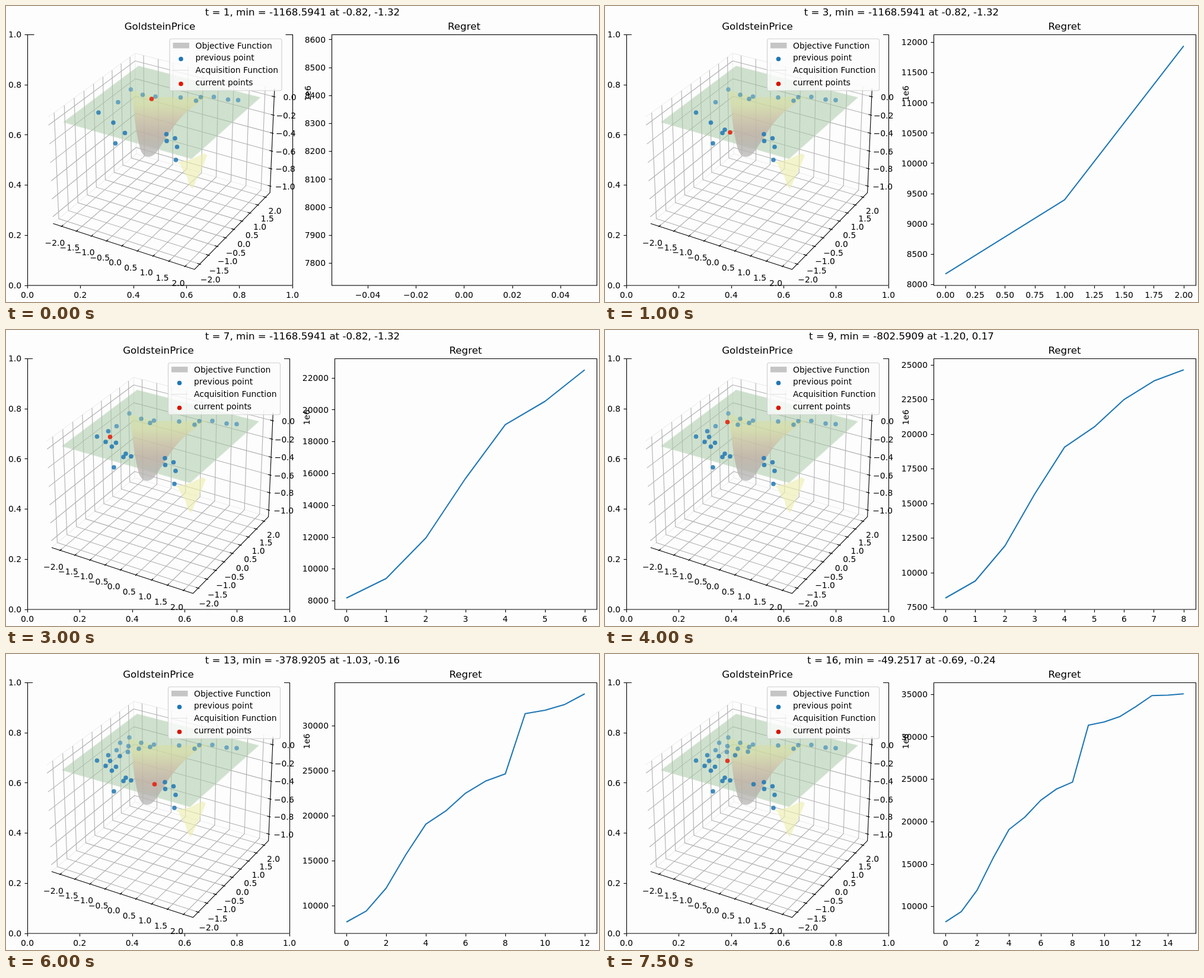
Recreate the animation shown at these times as an HTML page with a canvas. Size 1000x500 px, loop 8 s.

```html
<!DOCTYPE html>
<html lang="en">
<head>
<meta charset="utf-8">
<title>Optimisation progress</title>
<style>
html, body { margin: 0; width: 100%; height: 100%; overflow: hidden; background: #fdfdfd; }
canvas { display: block; width: 1000px; height: 500px; }
</style>
</head>
<body>
<canvas id="stage"></canvas>
<script>
const STEP = 500, LOOP = 8000;
const FONT = '"DejaVu Sans", sans-serif';
const BLUE = '#1f77b4', GRID = '#b0b0b0', PAPER = '#fdfdfd';
const TOP = 48, BOTTOM = 472;

const regret = [8169, 9397, 11942, 15690, 19062, 20525, 22505, 23843,
  24646, 31352, 31731, 32380, 33560, 34838, 34887, 35045];
const minima = [[1, '-1168.5941 at -0.82, -1.32'], [9, '-802.5909 at -1.20, 0.17'],
  [11, '-378.9205 at -1.03, -0.16'], [15, '-49.2517 at -0.69, -0.24']];
const initial = [[208, 141], [228, 150], [249.5, 153], [292, 154.5], [318, 160], [326, 154],
  [348, 153.5], [372, 158], [389, 159], [186.5, 162.5], [153.5, 180], [178.5, 197],
  [198, 214.5], [182, 232], [268, 216.5], [268.5, 228], [282.5, 223.5], [286, 238], [284, 260]];
const sampled = [[243, 157], [202, 209], [211, 213.5], [168, 189], [172.5, 171], [185.5, 190.5],
  [175.5, 180.5], [224, 160], [206.5, 155.5], [192.5, 150], [205.5, 165.5], [192, 172.5],
  [250.5, 220], [241, 165], [219.5, 171], [206.5, 180.5]];

const canvas = document.getElementById('stage');
const ctx = canvas.getContext('2d');
const dpr = window.devicePixelRatio || 1;
canvas.width = 1000 * dpr;
canvas.height = 500 * dpr;

function text(str, x, y, align = 'center', size = 13.89) {
  ctx.font = `${size}px ${FONT}`;
  ctx.textAlign = align;
  ctx.fillStyle = '#000';
  ctx.fillText(str, x, y);
}

function line(points, color = '#000', width = 1.1) {
  ctx.beginPath();
  points.forEach(p => ctx.lineTo(...p));
  ctx.strokeStyle = color;
  ctx.lineWidth = width;
  ctx.stroke();
}

function fill(points, style) {
  ctx.beginPath();
  points.forEach(p => ctx.lineTo(...p));
  ctx.closePath();
  ctx.fillStyle = style;
  ctx.fill();
}

function dot(x, y, color, alpha = 1, r = 3.8) {
  ctx.globalAlpha = alpha;
  ctx.fillStyle = color;
  ctx.beginPath();
  ctx.arc(x, y, r, 0, 7);
  ctx.fill();
  ctx.globalAlpha = 1;
}

const label = (v, digits) => v.toFixed(digits).replace('-', '\u2212');
const snap = v => Math.floor(v) + 0.5;

// Perspective camera: elevation 30, azimuth -60, distance 10.
const LIM = 2.2917, ZMIN = -1.077, ZMAX = 0.085;
function project(x, y, z) {
  const X = x / LIM * 0.5714, Y = y / LIM * 0.5714;
  const Z = ((z - ZMIN) / (ZMAX - ZMIN) * 2 - 1) * 0.4286;
  const depth = 10 / (10 - (0.433 * X - 0.75 * Y + 0.5 * Z));
  return [263 + 239.2 * depth * (0.866 * X + 0.5 * Y),
    254 - 239.2 * depth * (-0.25 * X + 0.433 * Y + 0.866 * Z)];
}
const line3 = (a, b, color, width) => line([project(...a), project(...b)], color, width);

function tickStep(range) {
  const raw = range / 9, mag = 10 ** Math.floor(Math.log10(raw));
  return [1, 2, 2.5, 5, 10].find(s => s * mag >= raw * 0.9999) * mag;
}

function ticks(lo, hi) {
  const step = tickStep(hi - lo);
  let digits = 0;
  while (Math.abs(step * 10 ** digits - Math.round(step * 10 ** digits)) > 1e-6) digits++;
  const list = [];
  for (let i = Math.ceil(lo / step); i * step <= hi; i++) {
    list.push([i * step, label(i * step + 0, digits)]);
  }
  return list;
}

function axes(left, right, [x0, x1], [y0, y1], xTicks, yTicks) {
  const sx = v => left + (v - x0) / (x1 - x0) * (right - left);
  const sy = v => BOTTOM - (v - y0) / (y1 - y0) * (BOTTOM - TOP);
  for (const [v, name] of xTicks) {
    const x = snap(sx(v) + 0.3);
    line([[x, BOTTOM + 0.5], [x, BOTTOM + 5]]);
    text(name, sx(v), 493);
  }
  for (const [v, name] of yTicks) {
    const y = snap(sy(v) + 0.3);
    line([[left - 4.5, y], [left + 0.5, y]]);
    text(name, left - 10, sy(v) + 5, 'right');
  }
  ctx.strokeStyle = '#000';
  ctx.lineWidth = 1.1;
  ctx.strokeRect(left + 0.5, TOP + 0.5, right - left, BOTTOM - TOP - 0.5);
  return [sx, sy];
}

function drawBox() {
  const L = LIM, edge = '#ececec';
  line3([-L, -L, ZMAX], [-L, L, ZMAX], edge);
  line3([-L, L, ZMAX], [L, L, ZMAX], edge);
  line3([-L, L, ZMIN], [-L, L, ZMAX], edge);
  line3([-L, L, ZMIN], [L, L, ZMIN], edge);
  line3([-L, L, ZMIN], [-L, -L, ZMIN], edge);
  for (let i = -4; i <= 4; i++) {
    const v = i / 2;
    line([project(v, -L, ZMIN), project(v, L, ZMIN), project(v, L, ZMAX)], GRID);
    line([project(L, v, ZMIN), project(-L, v, ZMIN), project(-L, v, ZMAX)], GRID);
  }
  for (let i = 0; i <= 5; i++) {
    const z = -i / 5;
    line([project(-L, -L, z), project(-L, L, z), project(L, L, z)], GRID);
  }
}

function drawBoxAxes() {
  const L = LIM, inner = 2 * L / 60, outer = 2 * L / 120;
  line([project(-L, -L, ZMIN), project(L, -L, ZMIN), project(L, L, ZMIN), project(L, L, ZMAX)]);
  for (let i = -4; i <= 4; i++) {
    const v = i / 2, name = label(v, 1);
    line3([v, -L + inner, ZMIN], [v, -L - outer, ZMIN]);
    line3([L - inner, v, ZMIN], [L + outer, v, ZMIN]);
    const [ax, ay] = project(v, -L, ZMIN), [bx, by] = project(L, v, ZMIN);
    text(name, ax - 11.5, ay + 33);
    text(name, bx + 17 - i / 4, by + 29.5 - i * 0.4);
  }
  for (let i = 0; i <= 5; i++) {
    const z = -i / 5, y = project(L, L, z)[1];
    line3([L - inner, L, z], [L + outer, L, z]);
    text(label(z + 0, 1), 487 + 2 * z, y + 5.5, 'right');
  }
}

function drawSurfaces() {
  const z = 0.011;
  fill([[286, 264], [291, 267], [296, 278], [303, 289], [306, 302], [312, 309], [319, 293],
    [324, 283], [331, 267], [337, 252], [331, 249], [310, 259]], 'rgba(238,238,175,.62)');

  fill([[-2, -2], [-2, 2], [2, 2], [2, -2]].map(([x, y]) => project(x, y, z)),
    'rgba(178,209,176,.52)');
  for (let i = 0; i <= 60; i++) {
    const v = -2 + i / 15;
    line3([v, -2, z], [v, 2, z], 'rgba(130,170,130,.17)', 0.7);
    line3([-2, v, z], [2, v, z], 'rgba(130,170,130,.17)', 0.7);
  }

  const shade = ctx.createLinearGradient(0, 141, 0, 255);
  shade.addColorStop(0, 'rgba(213,226,160,.45)');
  shade.addColorStop(0.22, 'rgba(216,220,160,.65)');
  shade.addColorStop(0.45, 'rgba(205,190,165,.75)');
  shade.addColorStop(0.65, 'rgba(192,174,163,.78)');
  shade.addColorStop(0.85, 'rgba(182,178,174,.8)');
  shade.addColorStop(1, 'rgba(188,188,188,.8)');
  ctx.beginPath();
  ctx.moveTo(207, 141);
  ctx.bezierCurveTo(214, 170, 214, 205, 223, 238);
  ctx.bezierCurveTo(228, 260, 243, 258, 252, 246);
  ctx.bezierCurveTo(270, 222, 282, 188, 330, 158);
  ctx.lineTo(345, 153);
  ctx.lineTo(250, 154);
  ctx.closePath();
  ctx.fillStyle = shade;
  ctx.fill();
}

function drawLegend(red) {
  ctx.beginPath();
  ctx.roundRect(273.5, 55.5, 189, 87.5, 3);
  ctx.fillStyle = 'rgba(253,253,253,.8)';
  ctx.fill();
  ctx.strokeStyle = '#cfd3cf';
  ctx.lineWidth = 1.2;
  ctx.stroke();
  ctx.fillStyle = '#c5c5c5';
  ctx.fillRect(279, 62, 27.5, 9.5);
  dot(292.5, 89.5, BLUE);
  line([[279, 108.5], [306.5, 108.5]], '#dfe2df');
  dot(292.5, 131.5, red);
  ['Objective Function', 'previous point', 'Acquisition Function', 'current points']
    .forEach((name, i) => text(name, 317, 71.5 + i * 20.9, 'left'));
}

function drawScene(t) {
  const red = t < 3 ? '#e61400' : '#d81400';
  ctx.fillStyle = PAPER;
  ctx.fillRect(45, 40, 424, 431);
  drawBox();
  drawSurfaces();
  for (const [x, y] of initial.concat(sampled.slice(0, t - 1))) {
    dot(x, y, BLUE, Math.min(0.85, 0.48 + (y - 141) / 200 + (y > 170 ? 0.14 : 0)));
  }
  dot(...sampled[t - 1], '#e61e0a', 0.87);
  drawBoxAxes();
  drawLegend(red);
  ctx.save();
  ctx.translate(511.5, 147.5);
  ctx.rotate(-Math.PI / 2);
  text('1e6', 0, 0);
  ctx.restore();
}

function draw(t) {
  ctx.setTransform(dpr, 0, 0, dpr, 0, 0);
  ctx.fillStyle = PAPER;
  ctx.fillRect(0, 0, 1000, 500);

  // The panels narrow once the regret labels reach five digits.
  const wide = t < 3, right = wide ? 483 : 478, left = wide ? 549 : 554;
  const unit = [0, 1, 2, 3, 4, 5].map(i => [i / 5, label(i / 5, 1)]);
  axes(36, right, [0, 1], [0, 1], unit, unit);

  ctx.save();
  ctx.translate(wide ? 2.5 : 0, 0);
  drawScene(t);
  text('GoldsteinPrice', 257, 40, 'center', 16.67);
  ctx.restore();

  const data = regret.slice(0, t), last = t - 1;
  let lo = data[0], hi = data[last], x0 = 0, x1 = last;
  if (!last) [lo, hi, x0, x1] = [lo * 0.95, hi * 1.05, -0.05, 0.05];
  const pad = (a, b) => [a - (b - a) / 20, b + (b - a) / 20];
  const xs = pad(x0, x1), ys = pad(lo, hi);
  const [sx, sy] = axes(left, 996, xs, ys, ticks(...xs), ticks(...ys));
  ctx.lineJoin = 'round';
  if (last) line(data.map((v, i) => [sx(i), sy(v)]), BLUE, 2.08);
  text('Regret', (left + 996) / 2, 40, 'center', 16.67);

  const best = minima.filter(([from]) => from <= t).pop()[1];
  text(`t = ${t}, min = ${best}`, 500, 16, 'center', 16.67);
}

let shown = 0;
function tick() {
  const t = Math.floor(performance.now() % LOOP / STEP) + 1;
  if (t !== shown) draw(shown = t);
  requestAnimationFrame(tick);
}
tick();
</script>
</body>
</html>
```
